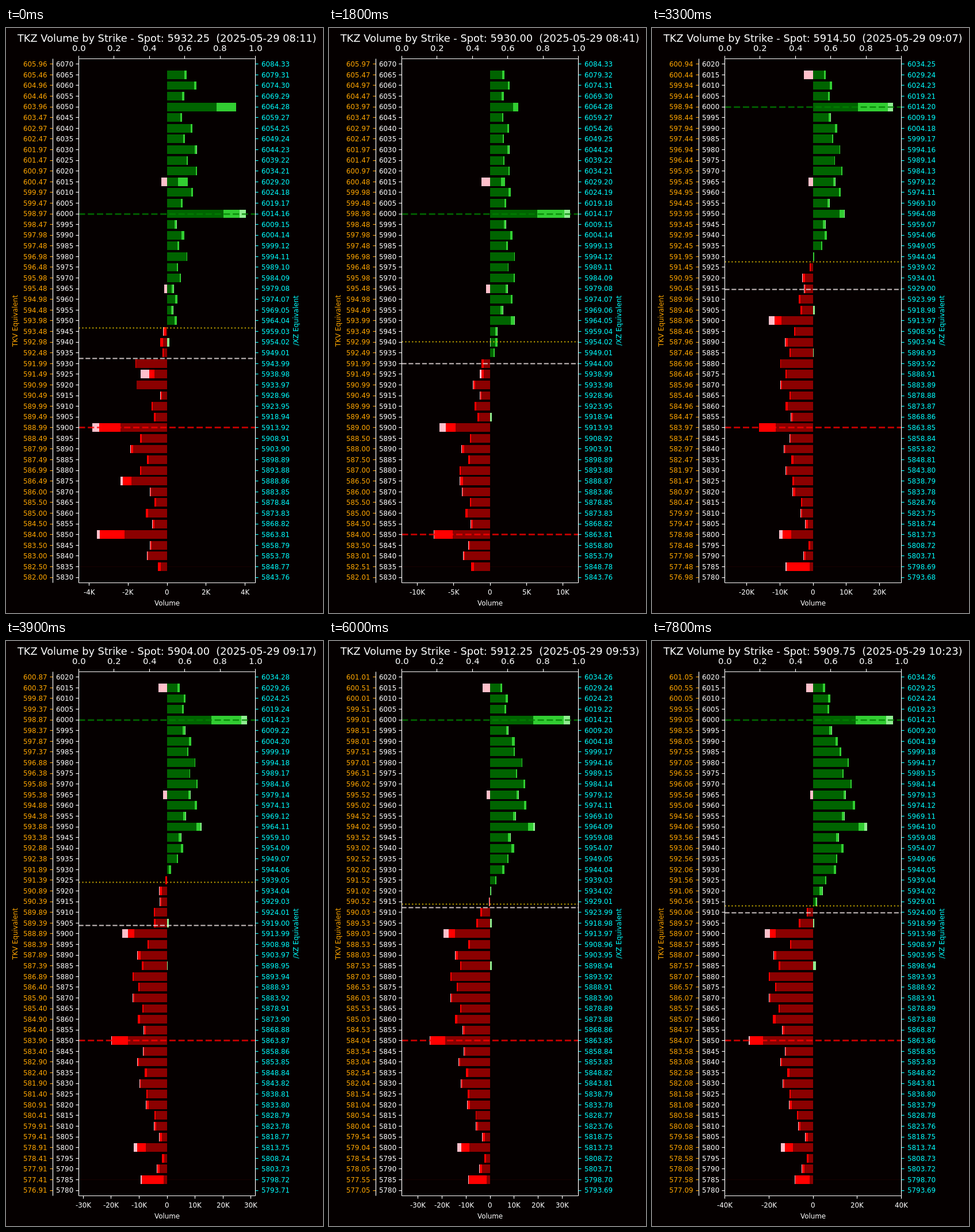
These frames come from a looping animation (551x1017 px, 8000 ms). An HTML page with a canvas:

```html
<!DOCTYPE html>
<html lang="en">
<head>
<meta charset="utf-8">
<title>Volume by Strike</title>
<style>
  html, body { margin: 0; width: 100%; height: 100%; overflow: hidden; background: #050000; }
  canvas { display: block; }
</style>
</head>
<body>
<canvas id="stage" width="551" height="1017"></canvas>
<script>
const ctx = document.getElementById('stage').getContext('2d');
const LOOP = 8000, STEP = 300, LAST = 26;
const LEFT = 126.6, RIGHT = 433.4, TOP = 53.5, BOTTOM = 964.3, MID = 280, HALF = 153.4;
const ROWS = 49, ROW = (BOTTOM - TOP) / ROWS, BAR = ROW * 0.8;
const GREENS = ['#006400', '#32cd32', '#90ee90'];
const REDS = ['#8b0000', '#ff0000', '#ffc0cb'];
const WHITE = '#fff', ORANGE = '#ffa500', CYAN = '#0ff';
const FONT = '"DejaVu Sans", sans-serif';
const SMALL = 11.87, MEDIUM = 14.83, LARGE = 17.8;

const lerp = (a, b, t) => a + (b - a) * t;
const random = seed => Math.abs(Math.sin(seed * 12.9898) * 43758.5453) % 1;

// Piecewise linear curve through [x, y] points sorted by rising x.
function along(points, x) {
  if (x <= points[0][0]) return points[0][1];
  const i = points.findIndex(p => p[0] >= x);
  if (i < 0) return points[points.length - 1][1];
  const [x0, y0] = points[i - 1], [x1, y1] = points[i];
  return lerp(y0, y1, (x - x0) / (x1 - x0));
}

// Market quotes over the steps; limit is half the volume axis in thousands.
const quotes = [
  { step: 0, spot: 5932.25, price: 592.21, flip: 5946.55, limit: 4.53 },
  { step: 4, spot: 5933.5, price: 592.32, flip: 5946.2, limit: 5.74 },
  { step: 9, spot: 5925, price: 591.52, flip: 5930.9, limit: 21.7 },
  { step: 13, spot: 5904, price: 589.29, flip: 5924.1, limit: 31.6 },
  { step: 16, spot: 5909.5, price: 590.05, flip: 5922.1, limit: 34.4 },
  { step: 20, spot: 5912.25, price: 590.25, flip: 5913.9, limit: 36.6 },
  { step: 26, spot: 5909.75, price: 590.04, flip: 5913.1, limit: 40.05 }
];
const quote = (step, read) => along(quotes.map(q => [q.step, read(q)]), step);

// Bar lengths in pixels: a curve over the strikes, a gain for round tens,
// peaks as [length, middle tip, outer tip], and bars on the opposite side.
const early = {
  gain: 0.22,
  curve: [[5835, -20], [5845, -38], [5870, -25], [5885, -45], [5895, -60], [5905, -30], [5915, -15], [5935, -10],
    [5945, -9], [5950, 14], [5965, 15], [5980, 29], [5995, 22], [6005, 34], [6025, 46], [6045, 33], [6070, 47]],
  peaks: { 6050: [120, 34, 0], 6015: [36, 17, 0], 6000: [137, 28, 11], 5930: [-55, 1, 0], 5925: [-46, 9, 15],
    5920: [-53, 0, 0], 5900: [-130, 37, 12], 5875: [-81, 15, 4], 5850: [-122, 43, 5] },
  counter: { 6015: -10, 5965: -5, 5940: 4 }
};
const opened = {
  gain: 0.13,
  curve: [[5790, -15], [5795, -9], [5815, -23], [5825, -40], [5845, -46], [5860, -40], [5875, -52], [5895, -37],
    [5905, -25], [5920, -21], [5930, -3], [5935, 14], [5940, 18], [5955, 30], [5960, 40], [5970, 43], [6005, 33],
    [6015, 26]],
  peaks: { 6000: [139, 52, 9], 5950: [50, 7, 1], 5900: [-76, 12, 10], 5850: [-92, 30, 0], 5800: [-59, 15, 6],
    5785: [-50, 43, 1.5] },
  counter: { 6015: -16, 5965: -8, 5905: 3.5 }
};
const late = {
  gain: 0.1,
  curve: [[5790, -18], [5795, -12], [5805, -16], [5825, -46], [5840, -52], [5855, -60], [5875, -73], [5890, -63],
    [5895, -45], [5905, -28], [5915, 8], [5920, 15], [5935, 47], [5945, 50], [5960, 66], [5985, 54], [5990, 39],
    [6005, 31], [6015, 23]],
  peaks: { 6000: [139, 53, 12], 5950: [94, 9.5, 5.5], 5900: [-84, 10.5, 8.5], 5850: [-112, 23, 1.5],
    5800: [-56, 14, 7], 5785: [-32, 25, 1] },
  counter: { 6015: -12, 5965: -5, 5905: 2, 5885: 5 }
};

function barOf({ gain, curve, peaks, counter }, strike) {
  const sway = strike % 10 ? 1 - gain : 1 + gain;
  const tip = 1.5 + 3 * random(strike), outer = random(strike + 1) > 0.7 ? 1 : 0;
  const bar = peaks[strike] || [along(curve, strike) * sway, tip, outer];
  return [...bar, counter[strike] || 0];
}

function mixedBar(step, strike) {
  const before = step < 9;
  const t = before ? 1 - (1 - Math.max(0, step - 4) / 5) ** 3 : (step - 9) / 17;
  const from = barOf(before ? early : opened, strike);
  const to = barOf(before ? opened : late, strike);
  const [length, middle, outer, counter] = from.map((v, i) => lerp(v, to[i], t));
  return { strike, length, middle, outer, counter };
}

function text(str, x, y, color, size = SMALL, anchor = 0.5) {
  ctx.font = `${size}px ${FONT}`;
  ctx.fillStyle = color;
  ctx.fillText(str, Math.round(x - ctx.measureText(str).width * anchor), Math.round(y));
}

function sideText(str, x, color) {
  ctx.save();
  ctx.translate(x, 509);
  ctx.rotate(-Math.PI / 2);
  text(str, 0, 0, color);
  ctx.restore();
}

function line(x1, y1, x2, y2, color, width = 1.2, dash = []) {
  const snap = v => Math.floor(v) + 0.5;
  ctx.strokeStyle = color;
  ctx.lineWidth = width;
  ctx.setLineDash(dash.map(d => d * width));
  ctx.beginPath();
  ctx.moveTo(snap(x1), snap(y1));
  ctx.lineTo(snap(x2), snap(y2));
  ctx.stroke();
}

function segment(from, to, y, color) {
  const top = Math.round(y - BAR / 2);
  const left = Math.round(MID + Math.min(from, to)), right = Math.round(MID + Math.max(from, to));
  ctx.fillStyle = color;
  ctx.fillRect(left, top, right - left, Math.round(y + BAR / 2) - top);
}

function drawBar({ length, middle, outer, counter }, y) {
  const sign = Math.sign(length), size = Math.abs(length);
  const second = Math.max(0, size - outer), first = Math.max(0, second - middle);
  const colors = sign > 0 ? GREENS : REDS;
  [0, first, second, size].forEach((edge, i, edges) => {
    if (i) segment(sign * edges[i - 1], sign * edge, y, colors[i - 1]);
  });
  segment(0, counter, y, (counter > 0 ? GREENS : REDS)[2]);
}

function drawVolumeAxis(limit) {
  const raw = 2 * limit / 8, power = 10 ** Math.floor(Math.log10(raw));
  const gap = power * [1, 2, 2.5, 5, 10].find(m => m * power >= raw);
  const count = Math.floor(limit / gap);
  for (let i = -count; i <= count; i++) {
    const x = MID + i * gap / limit * HALF;
    line(x, BOTTOM, x, BOTTOM + 5, WHITE);
    text(i ? i * gap + 'K' : '0', x, 985, WHITE);
  }
  text('Volume', MID, 1004, WHITE);
}

function drawTopAxis() {
  for (let i = 0; i <= 5; i++) {
    const x = lerp(LEFT, RIGHT, i / 5);
    line(x, TOP - 5, x, TOP, WHITE);
    text((i / 5).toFixed(1), x, 40, WHITE, MEDIUM);
  }
}

function drawTitle(spot, step) {
  const minutes = 491 + Math.floor(5 * step + 2 * Math.min(1, step / 15));
  const clock = [Math.floor(minutes / 60), minutes % 60].map(n => String(n).padStart(2, '0')).join(':');
  text(`TKZ Volume by Strike - Spot: ${spot.toFixed(2)}  (2025-05-29 ${clock})`, MID, 24, WHITE, LARGE);
}

function draw(step) {
  const spot = Math.round(quote(step, q => q.spot) * 4) / 4;
  const ratio = quote(step, q => q.price / q.spot);
  const top = Math.ceil(spot / 50 - 0.5) * 50 + 120;
  const yOf = strike => TOP + ((top - strike) / 5 + 0.5) * ROW;
  const level = (strike, color, width, dash) => line(LEFT, yOf(strike), RIGHT, yOf(strike), color, width, dash);
  const strikes = Array.from({ length: ROWS }, (_, i) => top - 5 * i);
  const bars = strikes.slice(1, -1).map(strike => mixedBar(step, strike));
  const dashed = [3.7, 1.6], dotted = [1, 1.65];

  ctx.fillStyle = '#050000';
  ctx.fillRect(0, 0, 551, 1017);
  line(LEFT, 936, RIGHT, 936, '#180000', 1);

  bars.forEach(bar => drawBar(bar, yOf(bar.strike)));
  const peak = bars.reduce((m, b) => b.length > m.length ? b : m);
  const trough = bars.reduce((m, b) => b.length < m.length ? b : m);
  level(peak.strike, 'rgba(0,128,0,.7)', 2.97, dashed);
  level(trough.strike, 'rgba(255,0,0,.72)', 2.97, dashed);
  level(quote(step, q => q.flip), 'rgba(255,215,0,.75)', 2.22, dotted);
  level(spot, 'rgba(255,245,245,.78)', 2.22, dashed);

  for (const strike of strikes) {
    const y = yOf(strike), base = y + 4.3;
    line(76, y, 81, y, ORANGE);
    line(LEFT - 5, y, LEFT, y, WHITE);
    line(RIGHT, y, RIGHT + 5, y, CYAN);
    text((strike * ratio).toFixed(2), 71, base, ORANGE, SMALL, 1);
    text(strike, 116.8, base, WHITE, SMALL, 1);
    text((strike * (spot + 14) / spot).toFixed(2), 443.8, base, CYAN, SMALL, 0);
  }

  for (const x of [81, LEFT, RIGHT]) line(x, TOP, x, BOTTOM, WHITE);
  for (const y of [TOP, BOTTOM]) line(LEFT, y, RIGHT, y, WHITE);
  drawTopAxis();
  drawVolumeAxis(quote(step, q => q.limit));
  sideText('TKV Equivalent', 19.5, ORANGE);
  sideText('/XZ Equivalent', 507.5, CYAN);
  drawTitle(spot, step);
}

const start = performance.now();
function tick() {
  const time = (performance.now() - start) % LOOP;
  draw(Math.min(LAST, Math.floor(time / STEP)));
  requestAnimationFrame(tick);
}
tick();
</script>
</body>
</html>
```
